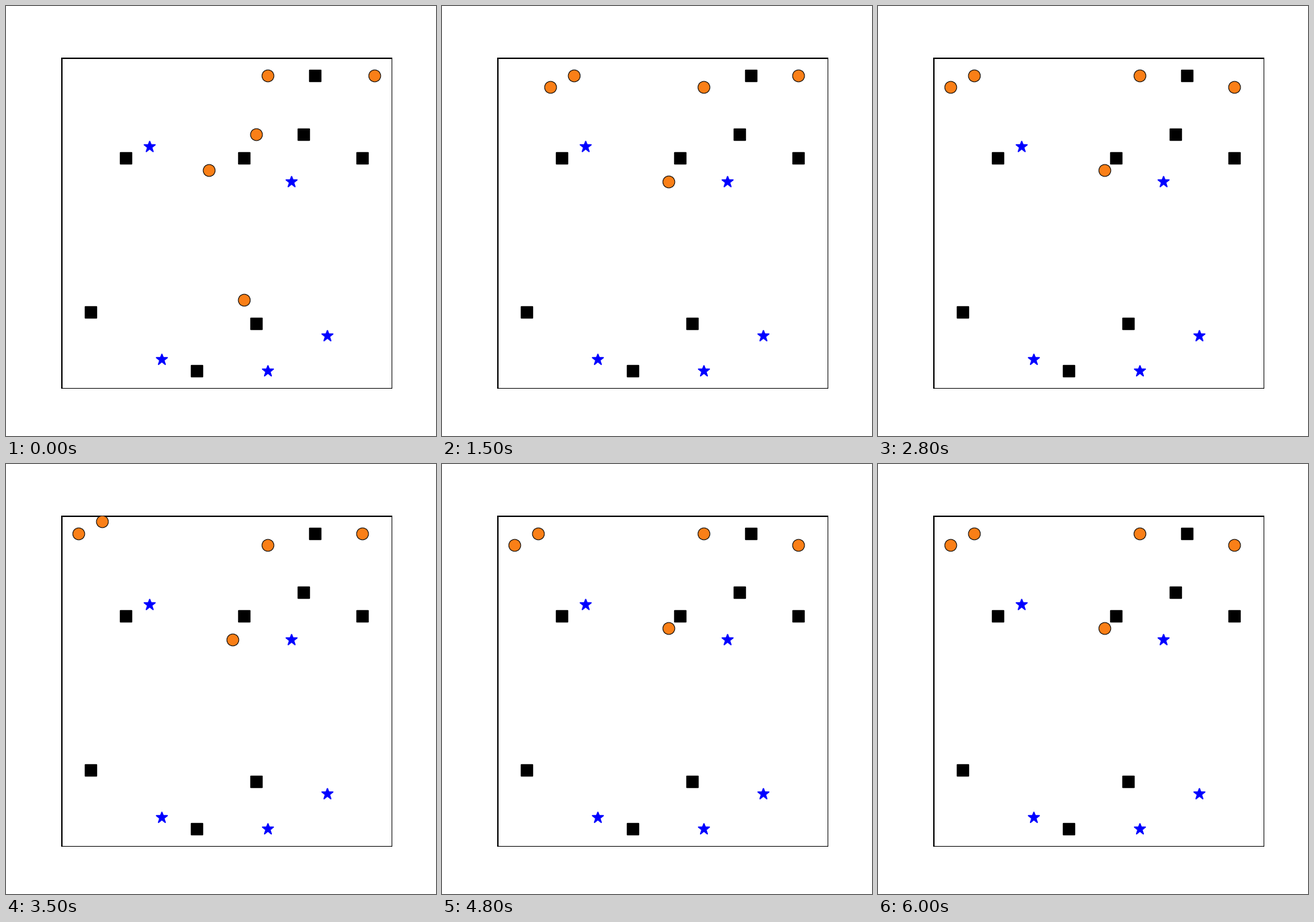
These frames come from a looping animation (600x600 px, 6.1 s). A matplotlib script:

```python
import matplotlib.pyplot as plt
from matplotlib.animation import FuncAnimation
from matplotlib.patches import Rectangle

SIZE = 28        # cells per side
FRAMES = 61
INTERVAL = 100   # ms

WALLS = [(21, 1), (20, 6), (5, 8), (15, 8), (25, 8), (2, 21), (16, 22), (11, 26)]
GOALS = [(7, 7), (19, 10), (22, 23), (8, 25), (17, 26)]

STEP = {"U": (0, -1), "D": (0, 1), "L": (-1, 0), "R": (1, 0)}

# start cell, approach moves, then a cycle repeated for the rest of the loop
AGENTS = [
    ((17, 1), "", "DU"),
    ((26, 1), "L", "DU"),
    ((16, 6), "U" * 4 + "L" * 3 + "U" + "L" * 10, "UD"),
    ((12, 9), "U" * 6 + "L" + "U" + "L" * 10, "UD"),
    ((15, 20), "L" + "U" * 10, "URDL"),
]


def walk(start, approach, cycle):
    x, y = start
    cells = [start]
    for i in range(FRAMES - 1):
        if i < len(approach):
            move = approach[i]
        else:
            move = cycle[(i - len(approach)) % len(cycle)]
        dx, dy = STEP[move]
        x, y = x + dx, y + dy
        cells.append((x, y))
    return cells


def centers(cells):
    return [x + 0.5 for x, _ in cells], [y + 0.5 for _, y in cells]


paths = [walk(*agent) for agent in AGENTS]

fig, ax = plt.subplots(figsize=(6, 6), dpi=100)
ax.set(xlim=(0, SIZE), ylim=(SIZE, 0), aspect="equal")
ax.axis("off")
ax.add_patch(Rectangle((0, 0), SIZE, SIZE, fill=False, ec="black", lw=2))

ax.plot(*centers(WALLS), "s", color="black", ms=12, mew=1)
ax.plot(*centers(GOALS), "*", color="blue", ms=12, mew=1)
robots, = ax.plot([], [], "o", mfc="#fa7f17", mec="black", ms=12, mew=0.7)


def update(frame):
    robots.set_data(*centers([path[frame] for path in paths]))
    return robots,


anim = FuncAnimation(fig, update, frames=FRAMES, interval=INTERVAL,
                     repeat=True, repeat_delay=0)
plt.show()
```
